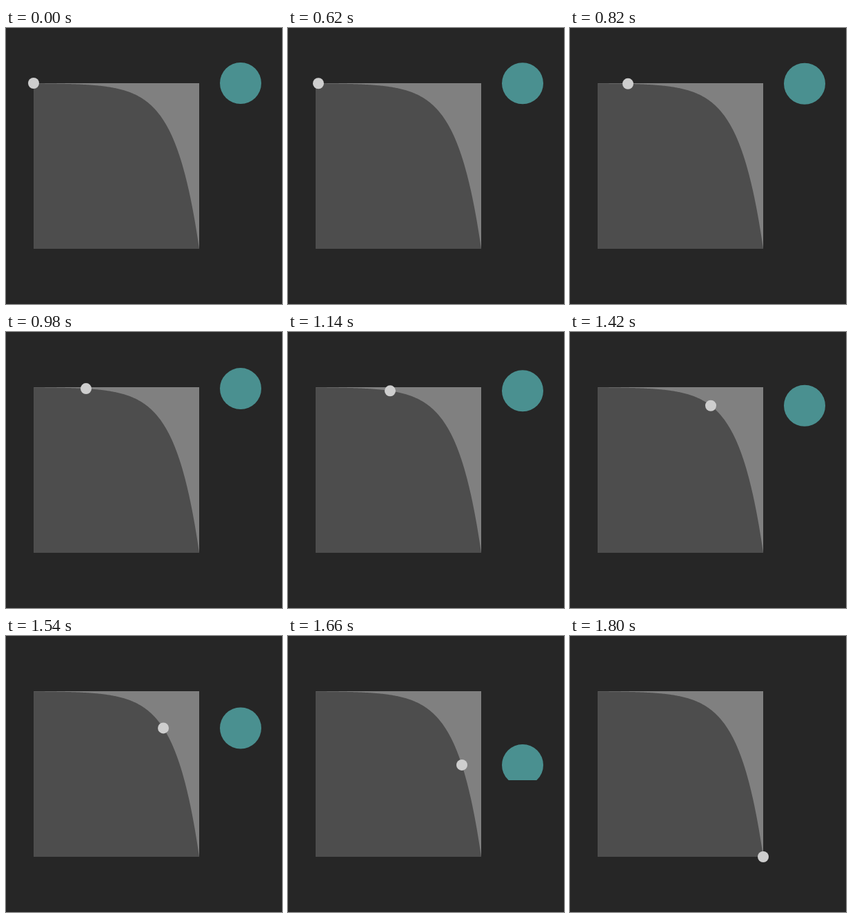
These frames come from a looping animation (400 by 400 pixels, 2.42 s). An HTML page with a canvas:

```html
<!DOCTYPE html>
<html lang="en">
<head>
<meta charset="utf-8">
<title>Exponential ease-in</title>
<style>
  html, body { margin: 0; width: 100%; height: 100%; overflow: hidden; background: #262626; }
  canvas { display: block; width: 400px; height: 400px; }
</style>
</head>
<body>
<canvas id="stage" width="400" height="400"></canvas>
<script>
  const ctx = document.getElementById('stage').getContext('2d');

  const LOOP = 2420, TICK = 20, HOLD = 30, STEPS = 60;
  const LEFT = 40, TOP = 80, SIZE = 240;
  const CLIP_BOTTOM = 209;

  const easeIn = p => p <= 0 ? 0 : Math.pow(2, 10 * (p - 1));
  const plotX = p => LEFT + SIZE * p;
  const plotY = p => TOP + SIZE * easeIn(p);

  function disc(x, y, r, color) {
    ctx.fillStyle = color;
    ctx.beginPath();
    ctx.arc(x, y, r, 0, Math.PI * 2);
    ctx.fill();
  }

  function drawPlot() {
    ctx.fillStyle = '#808080';
    ctx.fillRect(LEFT, TOP, SIZE, SIZE);
    ctx.fillStyle = '#4d4d4d';
    ctx.beginPath();
    ctx.moveTo(LEFT, TOP + SIZE);
    for (let i = 0; i <= SIZE; i++) ctx.lineTo(plotX(i / SIZE), plotY(i / SIZE));
    ctx.closePath();
    ctx.fill();
  }

  // The large disc is only visible above CLIP_BOTTOM.
  function drawFollower(y) {
    ctx.save();
    ctx.beginPath();
    ctx.rect(0, 0, 400, CLIP_BOTTOM);
    ctx.clip();
    disc(340, y, 30, '#4a9090');
    ctx.restore();
  }

  function draw(ms) {
    const tick = Math.floor((ms + 0.01) / TICK) - HOLD;
    const p = Math.min(Math.max(tick, 0), STEPS) / STEPS;
    ctx.fillStyle = '#262626';
    ctx.fillRect(0, 0, 400, 400);
    drawPlot();
    drawFollower(plotY(p));
    disc(plotX(p), plotY(p), 8, '#cecece');
  }

  let start = null;
  function frame(now) {
    if (start === null) start = now;
    draw((now - start) % LOOP);
    requestAnimationFrame(frame);
  }
  draw(0);
  requestAnimationFrame(frame);
</script>
</body>
</html>
```
